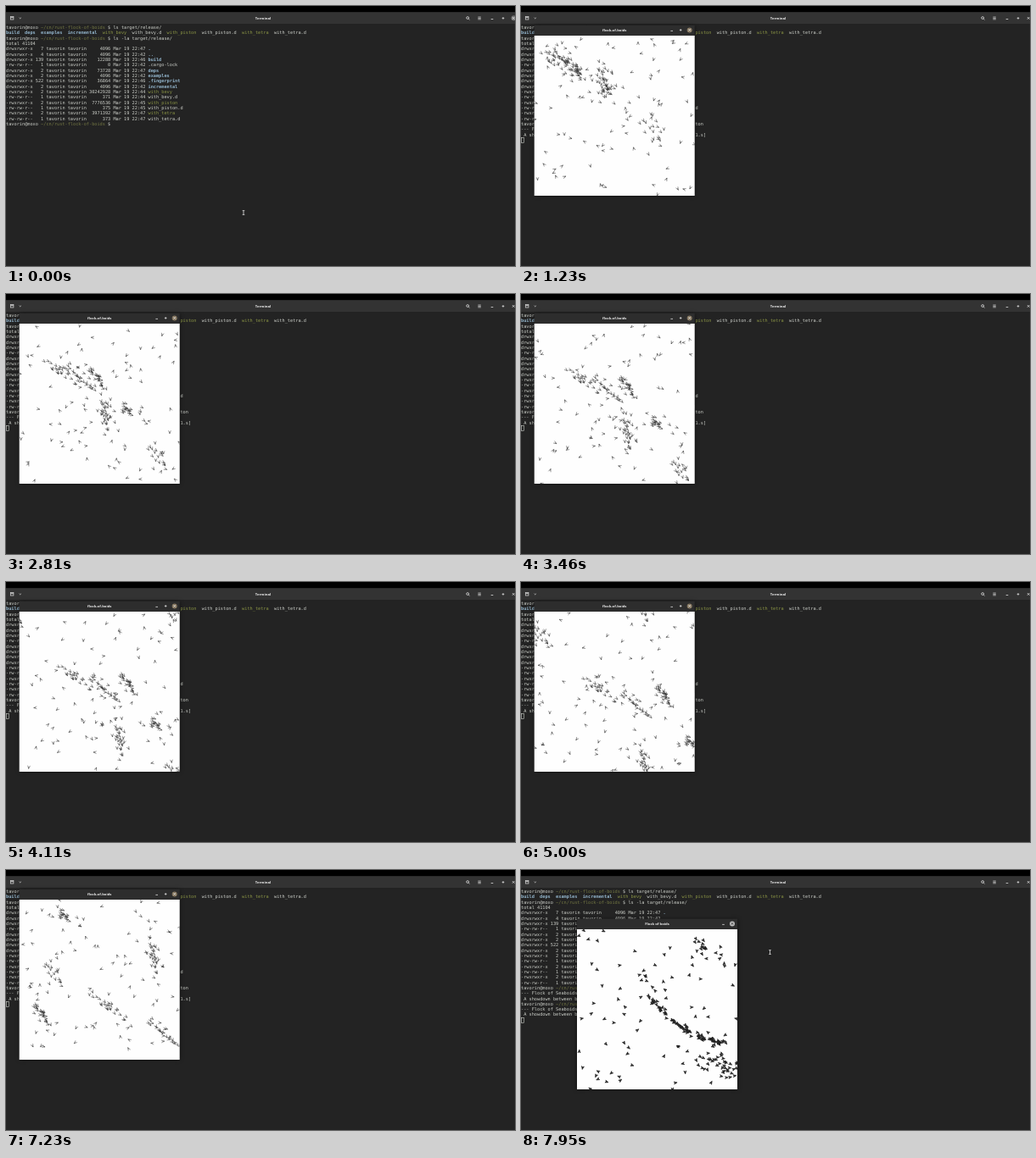
An HTML page with a canvas that plays this animation: 600x307 px, repeating every 8000 ms.

```html
<!DOCTYPE html>
<html lang="en">
<head>
<meta charset="utf-8">
<title>Flock of boids</title>
<style>
  html, body { margin: 0; width: 100%; height: 100%; overflow: hidden; background: #232323; }
  canvas { display: block; width: 600px; height: 307px; }
</style>
</head>
<body>
<canvas id="stage" width="600" height="307"></canvas>
<script>
const ctx = document.getElementById('stage').getContext('2d');
const LOOP = 8000, CELL = 3.16, LINE = 6.32;
const FG = '#cdd0ca', DIR = '#92b4cb', EXE = '#8b9545', PATH = '#737743';
const MONO = '"DejaVu Sans Mono", monospace', SANS = '"Open Sans", sans-serif';
const USER = 'tavorin', HOST = 'moxo';

// Moments in the loop, in ms
const TYPE_1 = 70, RUN_1 = 470, OPEN_1 = 540, CLOSE_1 = 7320;
const TYPE_2 = 7340, RUN_2 = 7470, OPEN_2 = 7540;

const rnd = n => { const v = Math.sin(n * 127.1 + 3.7) * 43758.5453; return v - Math.floor(v); };
const spread = n => rnd(n) + rnd(n + .31) + rnd(n + .67) - 1.5;
const mod = (a, n) => ((a % n) + n) % n;

function rect(x, y, w, h, color) {
  ctx.fillStyle = color;
  ctx.fillRect(x, y, w, h);
}
function line(x1, y1, x2, y2, color = '#ddd', width = .8) {
  ctx.strokeStyle = color;
  ctx.lineWidth = width;
  ctx.beginPath();
  ctx.moveTo(x1, y1);
  ctx.lineTo(x2, y2);
  ctx.stroke();
}
function disc(x, y, r, color) {
  ctx.fillStyle = color;
  ctx.beginPath();
  ctx.arc(x, y, r, 0, 7);
  ctx.fill();
}
function title(text, x, y) {
  ctx.font = `bold 4.2px ${SANS}`;
  ctx.textAlign = 'center';
  ctx.fillStyle = '#eee';
  ctx.fillText(text, x, y);
}

// Header buttons, centred on x, y
const minus = (x, y) => line(x - 1.3, y, x + 1.3, y);
function plus(x, y) {
  minus(x, y);
  line(x, y - 1.3, x, y + 1.3);
}
function cross(x, y, color) {
  line(x - 1.2, y - 1.2, x + 1.2, y + 1.2, color);
  line(x - 1.2, y + 1.2, x + 1.2, y - 1.2, color);
}

// ---- terminal ----
const listing = `\
drwxrwxr-x   7 USER USER     4096 Mar 19 22:47 .
drwxrwxr-x   4 USER USER     4096 Mar 19 22:42 ..
drwxrwxr-x 139 USER USER    12288 Mar 19 22:46 build
-rw-rw-r--   1 USER USER        0 Mar 19 22:42 .cargo-lock
drwxrwxr-x   2 USER USER    73728 Mar 19 22:47 deps
drwxrwxr-x   2 USER USER     4096 Mar 19 22:42 examples
drwxrwxr-x 522 USER USER    36864 Mar 19 22:46 .fingerprint
drwxrwxr-x   2 USER USER     4096 Mar 19 22:42 incremental
-rwxrwxr-x   2 USER USER 30242928 Mar 19 22:44 with_bevy
-rw-rw-r--   1 USER USER      371 Mar 19 22:44 with_bevy.d
-rwxrwxr-x   2 USER USER  7776536 Mar 19 22:45 with_piston
-rw-rw-r--   1 USER USER      375 Mar 19 22:45 with_piston.d
-rwxrwxr-x   2 USER USER  3971392 Mar 19 22:47 with_tetra
-rw-rw-r--   1 USER USER      373 Mar 19 22:47 with_tetra.d`.replaceAll('USER', USER).split('\n');
const NAME_COL = 53;

function put(row, col, text, color = FG, bold = false) {
  ctx.font = `${bold ? 'bold ' : ''}5.25px ${MONO}`;
  ctx.textAlign = 'left';
  ctx.fillStyle = color;
  ctx.fillText(text, col * CELL, 27.1 + row * LINE);
}
function prompt(row, command) {
  put(row, 0, `${USER}@${HOST}`);
  put(row, 13, '~/cn/rust-flock-of-boids', PATH);
  put(row, 38, '$ ' + command);
}
function putName(row, col, entry) {
  const isDir = entry[0] === 'd';
  put(row, col, entry.slice(NAME_COL), isDir ? DIR : entry[3] === 'x' ? EXE : FG, isDir);
}
function putListings() {
  prompt(0, 'ls target/release/');
  let col = 0;
  for (const entry of listing.filter(e => e[NAME_COL] !== '.')) {
    putName(1, col, entry);
    col += entry.length - NAME_COL + 2;
  }
  prompt(2, 'ls -la target/release/');
  put(3, 0, 'total 41104');
  listing.forEach((entry, i) => {
    put(4 + i, 0, entry.slice(0, NAME_COL));
    putName(4 + i, NAME_COL, entry);
  });
}
function cursor(row, col, focused) {
  const x = col * CELL, y = 22.8 + row * LINE;
  if (focused) return rect(x, y, CELL, 5.8, FG);
  ctx.strokeStyle = FG;
  ctx.lineWidth = .6;
  ctx.strokeRect(x + .5, y, CELL - .4, 5.8);
}
function session(t, row, engine, typeAt, runAt, openAt) {
  const command = './target/release/with_' + engine;
  const progress = Math.min(1, Math.max(0, (t - typeAt) / (runAt - typeAt - 40)));
  const typed = Math.ceil(command.length * progress);
  prompt(row, command.slice(0, typed));
  if (t < runAt) {
    if (typed) cursor(row, 40 + typed, true);
    return;
  }
  put(row + 1, 0, '--- Flock of Seaboids ---');
  put(row + 2, 0, ` A showdown between bevy, piston, and tetra. [${engine} window v0.1.1.s]`);
  if (engine === 'tetra' || t < CLOSE_1) cursor(row + 3, 0, t < openAt);
}

function header(focused) {
  rect(0, 0, 600, 7.3, '#000');
  rect(0, 7.3, 600, 14.4, '#333');
  rect(0, 21.2, 600, .6, '#1b1b1b');
  title('Terminal', 303, 16);
  ctx.strokeStyle = '#ddd';
  ctx.lineWidth = .7;
  ctx.strokeRect(5.3, 12.4, 3.6, 3.6);
  line(5.3, 13.6, 8.9, 13.6);
  line(15.6, 13.8, 16.7, 14.8);
  line(16.7, 14.8, 17.8, 13.8);
  ctx.beginPath();
  ctx.arc(544.2, 14, 1.4, 0, 7);
  ctx.stroke();
  line(545.2, 15, 546.5, 16.3);
  for (let y = 13; y < 16; y += 1.4) line(556.4, y, 559.8, y, '#ddd', .7);
  minus(573, 15.5);
  plus(586, 14.4);
  if (focused) disc(598.5, 14.2, 3, '#777');
  cross(598.2, 14.4, '#eee');
}

// ---- boids ----
const SIZE = 189;

function boid(view, x, y, angle) {
  const s = view.bold ? .82 : .8;
  ctx.save();
  ctx.translate(view.x + mod(x - view.x, SIZE), view.y + mod(y - view.y, SIZE));
  ctx.rotate(angle);
  ctx.scale(s, s);
  ctx.beginPath();
  ctx.moveTo(-2.1, 1.8);
  ctx.lineTo(2.5, 0);
  ctx.lineTo(-2.1, -1.8);
  if (view.bold) {
    ctx.lineTo(-.9, 0);
    ctx.closePath();
    ctx.fill();
  } else {
    ctx.moveTo(2.5, 0);
    ctx.lineTo(-.6, 0);
  }
  ctx.stroke();
  ctx.restore();
}

function loners(view, t) {
  const seconds = t / 1000;
  for (let i = 0; i < view.loners; i++) {
    const n = view.seed + i * 5.3, course = rnd(n) * 6.28;
    const way = (12 + 26 * rnd(n + 1)) * seconds;
    boid(view, rnd(n + 2) * SIZE + Math.cos(course) * way, rnd(n + 3) * SIZE + Math.sin(course) * way,
      course + .35 * Math.sin(seconds + i));
  }
}

// A flock is a streak around x, y reaching dx, dy to both sides, moving at vx, vy px/s.
// It gathers from a loose crowd after its window opens.
function flock(view, t, f, index) {
  const seconds = (t - view.refTime) / 1000;
  const loose = 1 + 1.6 * Math.exp((view.openAt - t) / 900);
  const course = Math.atan2(f.vy, f.vx);
  for (let i = 0; i < f.count; i++) {
    const n = view.seed + 67 + index * 91 + i * 3.1, along = 2 * rnd(n) - 1;
    const stray = f.jitter * loose * (.35 + 1.5 * rnd(n + 4) ** 2);
    boid(view,
      f.x + f.vx * seconds + f.dx * along + spread(n + 1) * stray,
      f.y + f.vy * seconds + f.dy * along + (f.bend || 0) * (1 - along * along) + spread(n + 2) * stray,
      course + spread(n + 3) * .8);
  }
}

const first = {
  x: 15.7, y: 35, title: 'flock-of-boids', close: '#85765f',
  openAt: OPEN_1, refTime: 4110, seed: 11, loners: 85,
  flocks: [
    { count: 24, x: 82, y: 112, vx: 13, vy: 16, dx: 20, dy: 15, jitter: 6 },
    { count: 24, x: 116, y: 127, vx: 22, vy: 21, dx: 17, dy: 14, jitter: 6 },
    { count: 26, x: 144, y: 121, vx: 28, vy: 16, dx: 8, dy: 12, jitter: 8 },
    { count: 30, x: 133, y: 184, vx: 13, vy: 34, dx: 5, dy: 24, jitter: 7 },
    { count: 20, x: 178, y: 171, vx: 26, vy: 24, dx: 9, dy: 6, jitter: 8 },
    { count: 18, x: 200, y: 230, vx: 15, vy: 27, dx: 9, dy: 12, jitter: 11 }
  ]
};
const second = {
  x: 66, y: 70, title: 'Flock of boids', close: '#bbb', bold: true,
  openAt: OPEN_2, refTime: 7950, seed: 307, loners: 92,
  flocks: [
    { count: 80, x: 195, y: 176, vx: 32, vy: 20, dx: 44, dy: 27, bend: 13, jitter: 2 },
    { count: 34, x: 233, y: 228, vx: 36, vy: 10, dx: 20, dy: 5, jitter: 6 },
    { count: 12, x: 212, y: 89, vx: 25, vy: 25, dx: 5, dy: 4, jitter: 4 }
  ]
};

function appWindow(view, t) {
  if (t < view.openAt) return;
  const { x, y } = view, right = x + SIZE, mid = y - 6.6;
  ctx.save();
  ctx.shadowColor = 'rgba(0,0,0,.6)';
  ctx.shadowBlur = 5;
  rect(x, y - 12.3, SIZE, SIZE + 12.3, '#2d2d2d');
  ctx.restore();
  title(view.title, x + SIZE / 2, mid + 1.6);
  disc(right - 6, mid, 3, view.close);
  cross(right - 6, mid, view.bold ? '#333' : '#eee');
  minus(right - (view.bold ? 16.5 : 27), mid + 1);
  if (!view.bold) plus(right - 16.5, mid);

  rect(x, y, SIZE, SIZE, '#fefefe');
  ctx.save();
  ctx.beginPath();
  ctx.rect(x, y, SIZE, SIZE);
  ctx.clip();
  ctx.fillStyle = '#222';
  ctx.strokeStyle = view.bold ? '#222' : 'rgba(40,40,40,.7)';
  ctx.lineWidth = .75;
  loners(view, t);
  view.flocks.forEach((f, i) => flock(view, t, f, i));
  ctx.restore();
}

function pointer(x, y) {
  line(x, y - 2.4, x, y + 2.4);
  minus(x, y - 2.4);
  minus(x, y + 2.4);
}

function draw(t) {
  const firstClosed = t >= CLOSE_1;
  rect(0, 0, 600, 307, '#232323');
  header(t < OPEN_1 || (firstClosed && t < OPEN_2));
  putListings();
  session(t, 18, 'piston', TYPE_1, RUN_1, OPEN_1);
  if (firstClosed) session(t, 21, 'tetra', TYPE_2, RUN_2, OPEN_2);
  appWindow(firstClosed ? second : first, t);
  if (t < TYPE_1) pointer(280, 244);
  if (firstClosed) pointer(293.5, 97);
}

const start = performance.now();
function tick() {
  draw((performance.now() - start) % LOOP);
  requestAnimationFrame(tick);
}
tick();
</script>
</body>
</html>
```
